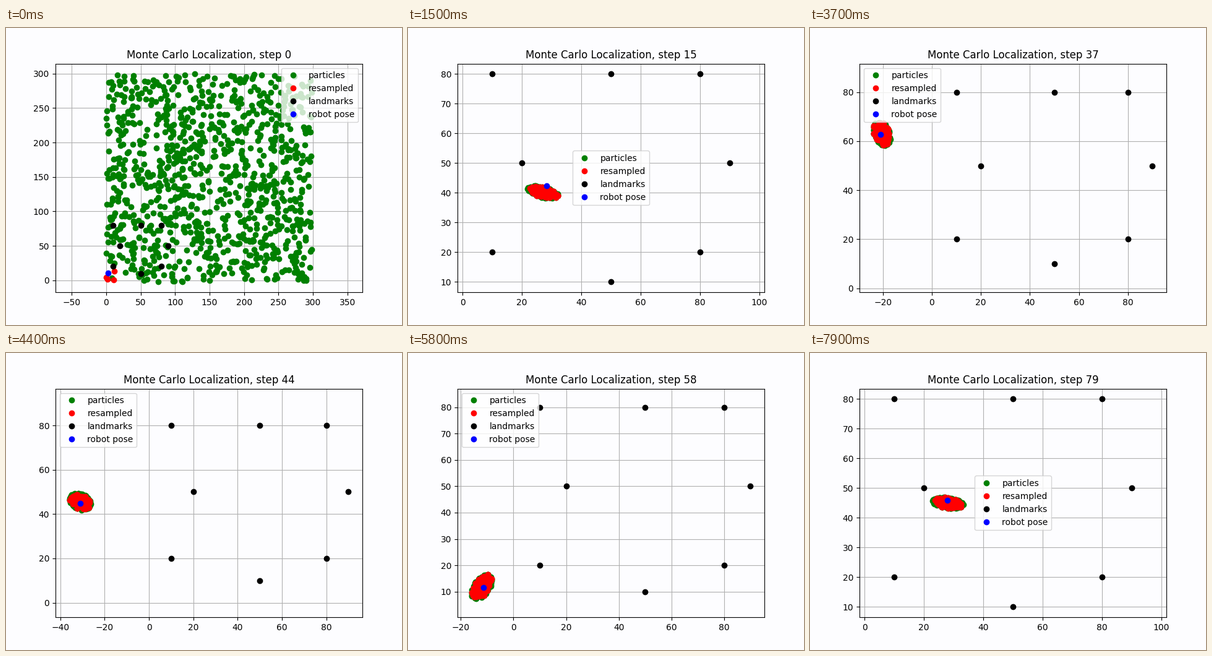
A matplotlib script for the animation above (8000 ms loop, 640 by 480 pixels).

```python
import matplotlib.pyplot as plt
import numpy as np
from matplotlib.animation import FuncAnimation

STEPS = 80
TURN, SPEED = 0.1, 3.0
TRAIL = 0.8
BACKGROUND = "#fdfdff"

LANDMARKS = np.array([(20, 50), (50, 10), (10, 20), (80, 20),
                      (90, 50), (80, 80), (50, 80), (10, 80)])
FIRST_SURVIVORS = np.array([(0, 4), (1.5, 1.5), (11, 0.5), (11.5, 13.5)])


def direction(angle):
    return np.array([np.cos(angle), np.sin(angle)])


def robot_pose(step):
    """Sum of straight moves, each made after a small left turn."""
    headings = TURN * np.arange(1, step + 2)
    return np.array([0, 10]) + SPEED * direction(headings).sum(axis=1)


def initial_particles(rng):
    return rng.uniform((-1, -2.6), (298.6, 299.6), (1000, 2)), FIRST_SURVIVORS


def tracked_particles(step, rng):
    """Elliptic cloud trailing the robot, with its resampled subset."""
    count = min(60 * step, 240)
    radius = rng.random(count) ** 0.6
    angle = rng.uniform(0, 2 * np.pi, count)

    scatter = 1 + np.exp(-step / 2)
    length = 5.3 * scatter
    width = (2.7 - 0.9 * np.cos(TURN * (step - 15))) * scatter

    # The long axis lags a little behind the radius of the circular path.
    heading = TURN * (step + 1)
    axis = heading - np.pi / 2 - 0.27
    early_error = 2.3 * np.exp(-(step / 20) ** 2)
    center = robot_pose(step) - TRAIL * direction(heading) - early_error

    along, across = radius * direction(angle) * [[length], [width]]
    particles = (center + np.outer(along, direction(axis))
                 + np.outer(across, direction(axis + np.pi / 2)))
    weights = 1.08 - radius
    chosen = rng.choice(count, count, p=weights / weights.sum())
    return particles, particles[chosen]


def draw(step):
    rng = np.random.default_rng(step + 7)
    if step == 0:
        particles, resampled = initial_particles(rng)
    else:
        particles, resampled = tracked_particles(step, rng)

    ax.clear()
    ax.set_facecolor(BACKGROUND)
    ax.plot(*particles.T, "go", label="particles")
    ax.plot(*resampled.T, "ro", label="resampled")
    ax.plot(*LANDMARKS.T, "ko", label="landmarks")
    ax.plot(*robot_pose(step), "bo", label="robot pose")
    ax.axis("equal")
    ax.grid(True)
    ax.set_title(f"Monte Carlo Localization, step {step}")
    ax.legend(loc="best" if step else "upper right")
    return ax.lines


plt.rcParams["font.family"] = "DejaVu Sans"
fig, ax = plt.subplots(figsize=(6.4, 4.8), dpi=100, facecolor=BACKGROUND)
animation = FuncAnimation(fig, draw, frames=STEPS, interval=100, repeat=True)
plt.show()
```
